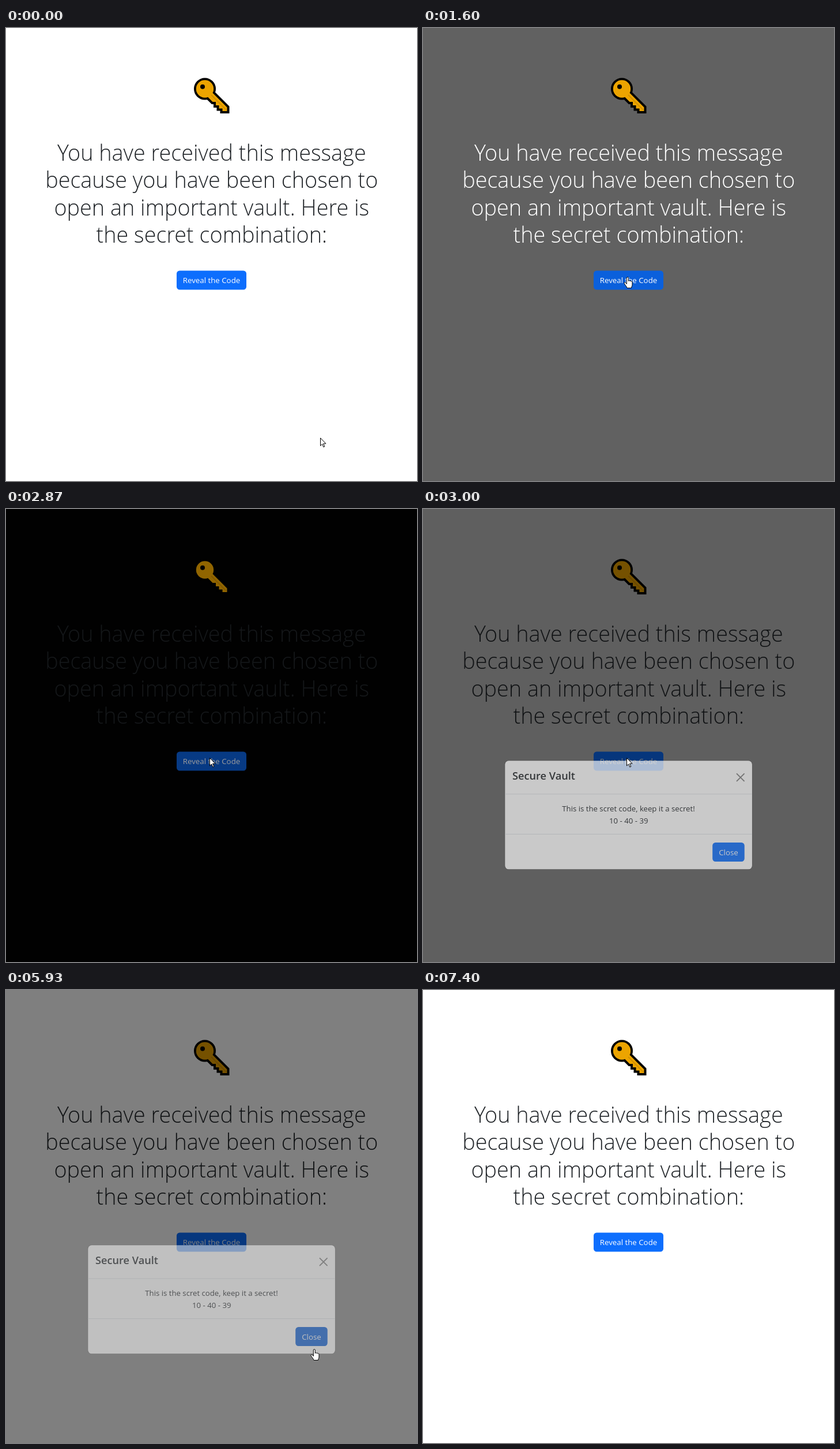
An HTML page that plays this animation: 713 by 785 pixels, repeating every 7590 ms.

```html
<!DOCTYPE html>
<html lang="en">
<head>
<meta charset="utf-8">
<title>Secure Vault</title>
<style>
  html, body { margin: 0; width: 100%; height: 100%; overflow: hidden; background: #fff; }
  svg { display: block; width: 713px; height: 785px; }
  text { font-family: "Open Sans", "Noto Sans", sans-serif; font-size: 13.2px; fill: #212529; }
  .mid { text-anchor: middle; }
  .heading text { font-size: 37.8px; font-weight: 300; fill: inherit; }
  .title { font-size: 18.2px; font-weight: 600; }
  .label { font-size: 13.3px; fill: #fff; }
  .pointer { fill: #fff; stroke: #000; stroke-linejoin: round; }
</style>
</head>
<body>
<svg viewBox="0 0 713 785">
  <rect id="page" width="713" height="785"/>

  <g id="key" fill="#eca400">
    <g stroke="#000" stroke-width="8">
      <circle cx="345" cy="105.5" r="15"/>
      <path id="shaft" d="M358 112L383.5 137.5V144H375.5V139.5H369.5V134H364V128H358.5L350 119.5Z"/>
    </g>
    <circle cx="345" cy="105.5" r="15.2"/>
    <use href="#shaft"/>
    <path d="M356 116L382 142" stroke="#ce8b00" stroke-width="1.6"/>
    <circle cx="341" cy="101.8" r="4" fill="#000"/>
  </g>

  <g id="heading" class="heading mid">
    <text x="356.8" y="229.5">You have received this message</text>
    <text x="356.8" y="277">because you have been chosen to</text>
    <text x="356.8" y="324.5">open an important vault. Here is</text>
    <text x="356.8" y="372">the secret combination:</text>
  </g>

  <rect id="reveal" x="296" y="420.5" width="121" height="33" rx="5.2"/>
  <text class="label mid" x="356.5" y="442">Reveal the Code</text>

  <rect id="backdrop" width="713" height="785"/>

  <g id="modal">
    <rect x="141.5" y="457.5" width="430" height="189.5" rx="7" fill="#000" fill-opacity=".175"/>
    <rect x="142.3" y="458.3" width="428.6" height="188" rx="6.3" fill="#fff"/>
    <path d="M142.3 516H570.9M142.3 585.5H570.9" stroke="#dee2e6"/>
    <text class="title" x="155" y="491">Secure Vault</text>
    <path d="M544.5 480.8L557 493.3M557 480.8L544.5 493.3" stroke="#000" stroke-opacity=".5" stroke-width="1.9" stroke-linecap="round"/>
    <text class="mid" x="356.5" y="546">This is the scret code, keep it a secret!</text>
    <text class="mid" x="356.8" y="567">10 - 40 - 39</text>
    <rect id="close" x="502.2" y="600" width="55.5" height="33" rx="5.2"/>
    <text class="label mid" x="530" y="622">Close</text>
  </g>

  <path id="arrow" class="pointer" d="M.5 .5V14L3.6 11 5.8 16.2 7.8 15.3 5.6 10.2H9.9Z"/>
  <path id="hand" class="pointer" d="M.3 12.5V2.2a1.5 1.5 0 0 1 3 0V7.5c.3-1.2 2.5-1.2 2.7.2.5-.9 2.1-.7 2.3.5.6-.7 1.7-.4 1.7.9V14c0 2-1.3 3-1.5 5.5H1C.5 17-2.2 14.8-4 11.3c-.5-1.6 1.3-2.2 2.3-1Z"/>
</svg>

<script>
const LOOP = 7590, STEP = 200 / 3;
const el = id => document.getElementById(id);
const set = (id, name, value) => el(id).setAttribute(name, value);
const clamp = x => Math.min(1, Math.max(0, x));
const ramp = (t, start, length) => clamp((t - start) / length);
const mix = (a, b, k) => a + (b - a) * k;
const rgb = (a, b, k) => `rgb(${a.map((v, i) => Math.round(mix(v, b[i], k)))})`;

function bezier(x1, y1, x2, y2) {
  const at = (a, b, s) => 3 * a * s * (1 - s) ** 2 + 3 * b * s * s * (1 - s) + s ** 3;
  return x => {
    if (x <= 0 || x >= 1) return clamp(x);
    let lo = 0, hi = 1;
    for (let i = 0; i < 20; i++) {
      const m = (lo + hi) / 2;
      if (at(x1, x2, m) < x) lo = m; else hi = m;
    }
    return at(y1, y2, lo);
  };
}
const ease = bezier(.25, .1, .25, 1), easeOut = bezier(0, 0, .58, 1);

const BLUE = [13, 110, 253], HOVER = [11, 94, 215], ACTIVE = [10, 88, 202];

// Pointer track: time, x, y
const track = [
  [67, 545, 710], [300, 520, 686], [600, 446, 604], [867, 383, 538],
  [1200, 366, 489], [1467, 356, 449], [1600, 353, 431],
  [3867, 353, 431], [3933, 353, 432], [4200, 353, 432], [4500, 382, 482],
  [4800, 446, 565], [5000, 533, 622], [5933, 533, 622], [6133, 512, 621],
  [6333, 487, 603], [6533, 471, 588], [6600, 469, 587], [6733, 469, 587],
  [6933, 395, 620], [7333, 134, 776], [7400, 100, 800]
];

function pointerAt(t) {
  const i = track.findIndex(p => p[0] > t);
  if (i < 0) return track[track.length - 1].slice(1);
  if (i === 0) return track[0].slice(1);
  const a = track[i - 1], b = track[i], k = (t - a[0]) / (b[0] - a[0]);
  return [Math.round(mix(a[1], b[1], k)), Math.round(mix(a[2], b[2], k))];
}

const buttonColor = (hover, pressed) => pressed ? rgb(ACTIVE, ACTIVE, 0) : rgb(BLUE, HOVER, hover);

function draw(t) {
  const dark = ease(ramp(t, 1492, 300)) - ease(ramp(t, 2865, 300));
  set('page', 'fill', rgb([255, 255, 255], [0, 0, 0], dark));
  set('heading', 'fill', t >= 1492 && t < 2865 ? '#fff' : '#212529');

  const revealHover = ramp(t, 1470, 150) - ramp(t, 2865, 150);
  set('reveal', 'fill', buttonColor(revealHover, t > 2700 && t < 2865));
  set('close', 'fill', buttonColor(ramp(t, 4985, 150), t > 5780 && t < 5930));

  set('backdrop', 'opacity', .5 * (ramp(t, 2750, 150) - ramp(t, 6010, 150)));
  const shown = easeOut(ramp(t, 2900, 300)) - easeOut(ramp(t, 5860, 300));
  set('modal', 'opacity', ramp(t, 2900, 150) - ramp(t, 5860, 150));
  set('modal', 'transform', `translate(0 ${-43 * (1 - shown)})`);

  const [x, y] = pointerAt(t);
  const hand = t > 1470 && t < 2865 || t > 5050 && t < 6000;
  for (const id of ['arrow', 'hand']) {
    set(id, 'transform', `translate(${x} ${y})`);
    set(id, 'visibility', (id === 'hand') === hand ? 'visible' : 'hidden');
  }
}

const origin = performance.now();
function tick() {
  const t = (performance.now() - origin) % LOOP;
  draw(Math.floor((t + 4) / STEP) * STEP);
  requestAnimationFrame(tick);
}
tick();
</script>
</body>
</html>
```
